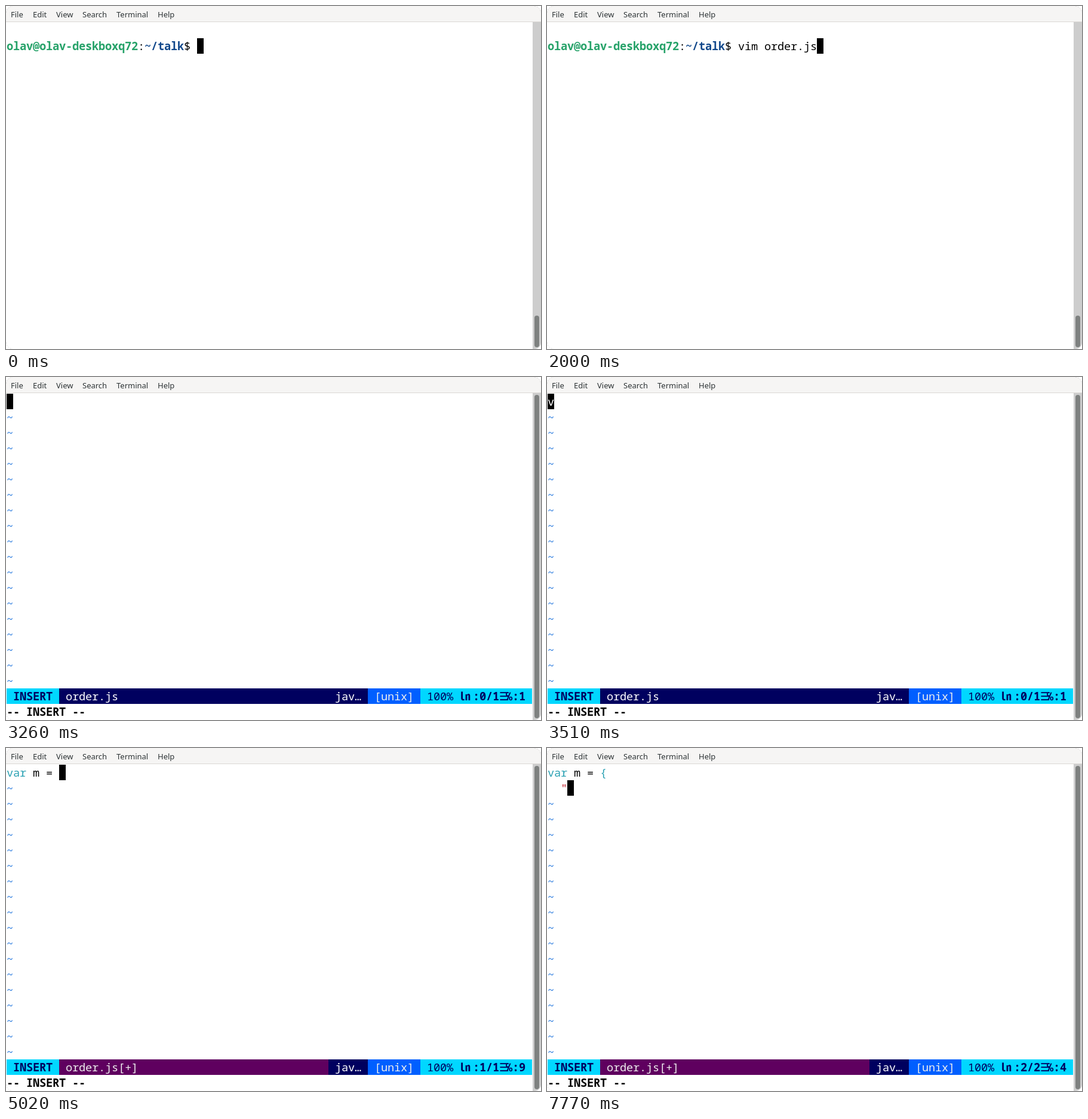
Recreate the animation shown at these times as an HTML page. Size 896 by 575 pixels, loop 8000 ms.

```html
<!DOCTYPE html>
<html lang="en">
<head>
<meta charset="utf-8">
<title>Terminal session</title>
<style>
  html, body { margin: 0; width: 100%; height: 100%; overflow: hidden; background: #fff; }
  svg { display: block; width: 896px; height: 575px; }
  text { white-space: pre; }
  .menu { font: 13px "Noto Sans", sans-serif; fill: #2e3436; }
  .cell { font: 18.667px "Noto Sans Mono", "Noto Sans CJK JP", "Noto Sans CJK SC", "DejaVu Sans", monospace; }
  .bold { font-weight: 700; }
  .wide { font-family: "Noto Sans CJK JP", "Noto Sans CJK SC", "Noto Sans CJK", sans-serif; }
  .sign { font-family: "DejaVu Sans", sans-serif; }
</style>
</head>
<body>
<svg id="stage" viewBox="0 0 896 575">
  <defs><clipPath id="window"><rect width="896" height="575" rx="11"/></clipPath></defs>
  <g clip-path="url(#window)">
    <rect width="896" height="575" fill="#fff"/>
    <rect width="896" height="26" fill="#f6f5f4"/>
    <rect y="26" width="896" height="1" fill="#dad7d4"/>
    <g id="menu" class="menu"></g>
    <rect x="882" y="27" width="14" height="548" fill="#cdcdcd"/>
    <rect id="thumb" x="885" width="8" rx="4" fill="#7e8180"/>
    <g id="screen"></g>
  </g>
  <path d="M.5 564A10.500 10.500 0 0 0 11 574.500M885 574.500A10.500 10.500 0 0 0 895.500 564M.5 11A10.500 10.500 0 0 1 11 .5M885 .5A10.500 10.500 0 0 1 895.500 11"
    fill="none" stroke="#d4d4d4" stroke-width=".7" stroke-dasharray="2 2"/>
</svg>
<script>
const LOOP = 8000, COL = 11, ROW = 26, LEFT = 1, TOP = 28, COLS = 80;
const NAVY = '#00005f', CYAN = '#2aa1b3', BLACK = '#000';
const $ = id => document.getElementById(id);

const NORMAL = { name: 'NORMAL', a: '#d7ff00', b: '#444444', c: '#1c1c1c', ink: '#5fffaf' };
const INSERT = { name: 'INSERT', a: '#00d7ff', b: '#005fff', c: NAVY, ink: '#ffffff' };

// Each step holds until the next one starts.
const steps = [
  { t: 0, cmd: '' },
  { t: 250, cmd: 'v' },
  { t: 500, cmd: 'vi' },
  { t: 750, cmd: 'vim ' },
  { t: 1000, cmd: 'vim o' },
  { t: 1250, cmd: 'vim ord' },
  { t: 1500, cmd: 'vim order' },
  { t: 1750, cmd: 'vim order.j' },
  { t: 2000, cmd: 'vim order.js' },
  { t: 2250, mode: NORMAL, lines: [''] },
  { t: 2750, mode: INSERT, lines: [''] },
  { t: 3510, mode: INSERT, lines: ['v'], pending: true },
  { t: 3760, mode: INSERT, lines: ['va'] },
  { t: 4010, mode: INSERT, lines: ['var '] },
  { t: 4510, mode: INSERT, lines: ['var m'] },
  { t: 4760, mode: INSERT, lines: ['var m ='] },
  { t: 5020, mode: INSERT, lines: ['var m = '] },
  { t: 5270, mode: INSERT, lines: ['var m = {'] },
  { t: 5770, mode: INSERT, lines: ['var m = {', '  '] },
  { t: 7520, mode: INSERT, lines: ['var m = {', '  "'] }
];

const escapeText = s => s.replace(/&/g, '&amp;').replace(/</g, '&lt;');
const left = col => LEFT + col * COL;

function box(col, row, cols, fill) {
  return `<rect x="${left(col)}" y="${TOP + row * ROW}" width="${cols * COL}" height="${ROW}" fill="${fill}"/>`;
}

// Text sits on the terminal's cell grid.
function put(col, row, str, fill = BLACK, style = '') {
  const xs = [...str].map((_, i) => left(col + i)).join(' ');
  return `<text class="cell ${style}" x="${xs}" y="${TOP + row * ROW + 20}" fill="${fill}">${escapeText(str)}</text>`;
}

function drawShell({ cmd }) {
  const user = 'olav@olav-deskboxq72', path = '~/talk';
  const pathCol = user.length + 1, end = pathCol + path.length;
  return put(0, 1, user, '#26a269', 'bold') + put(user.length, 1, ':') +
    put(pathCol, 1, path, '#12488b', 'bold') + put(end, 1, '$ ' + cmd) +
    box(end + 2 + cmd.length, 1, 1, BLACK);
}

function drawCode(line, row) {
  const tokens = line.match(/\bvar\b|[{"]|[^{"\s]+|\s+/g) || [];
  const colors = { var: CYAN, '{': CYAN, '"': '#c01c28' };
  let col = 0, out = '';
  for (const token of tokens) {
    if (token.trim()) out += put(col, row, token, colors[token]);
    col += token.length;
  }
  return out;
}

function drawStatus(mode, changed, line, total, column) {
  const row = 19, tail = ':' + column;
  const pos = COLS - 15 - tail.length;
  const unix = pos - 8, type = unix - 6;
  const ink = changed ? '#eeeeee' : mode.ink;
  const count = `:${line}/${total}`;
  return box(0, row, COLS, changed ? '#5f005f' : mode.c) +
    box(0, row, 8, mode.a) + put(1, row, mode.name, NAVY, 'bold') +
    put(9, row, 'order.js' + (changed ? '[+]' : ''), ink) +
    box(type, row, 6, mode.c) + put(type + 1, row, 'jav…', mode.ink) +
    box(unix, row, 8, mode.b) + put(unix + 1, row, '[unix]', '#eeeeee') +
    box(pos, row, COLS - pos, mode.a) + put(pos + 1, row, '100%', NAVY) +
    put(pos + 6, row, '㏑', NAVY, 'bold wide') +
    put(pos + 8, row, count, NAVY, 'bold') +
    put(pos + 12, row, '☰', NAVY, 'bold sign') +
    put(pos + 13, row, '℅' + tail, NAVY, 'bold');
}

function drawEditor({ mode, lines, pending }) {
  const last = lines.length - 1;
  const changed = !pending && lines[0] !== '';
  const col = pending ? 0 : lines[last].length;
  let out = lines.map(drawCode).join('');
  for (let row = lines.length; row < 19; row++) out += put(0, row, '~', '#2a7bde');
  out += box(col, last, 1, BLACK);
  if (pending) out += put(0, last, lines[last], '#fff');
  out += drawStatus(mode, changed, changed ? lines.length : 0, lines.length, col + 1);
  return out + (mode === INSERT ? put(0, 20, '-- INSERT --', BLACK, 'bold') : put(0, 20, '"order.js" [New]'));
}

const menu = { File: 8, Edit: 45, View: 84, Search: 128, Terminal: 185, Help: 254 };
$('menu').innerHTML = Object.entries(menu)
  .map(([label, x]) => `<text x="${x}" y="19">${label}</text>`).join('');

let shown = null;
function render(time) {
  const step = steps.filter(s => s.t <= time).pop();
  if (step === shown) return;
  shown = step;
  const top = step.mode ? 30 : 519;
  $('thumb').setAttribute('y', top);
  $('thumb').setAttribute('height', 572 - top);
  $('screen').innerHTML = step.mode ? drawEditor(step) : drawShell(step);
}

const start = performance.now();
function tick() {
  render((performance.now() - start) % LOOP);
  requestAnimationFrame(tick);
}
tick();
</script>
</body>
</html>
```
